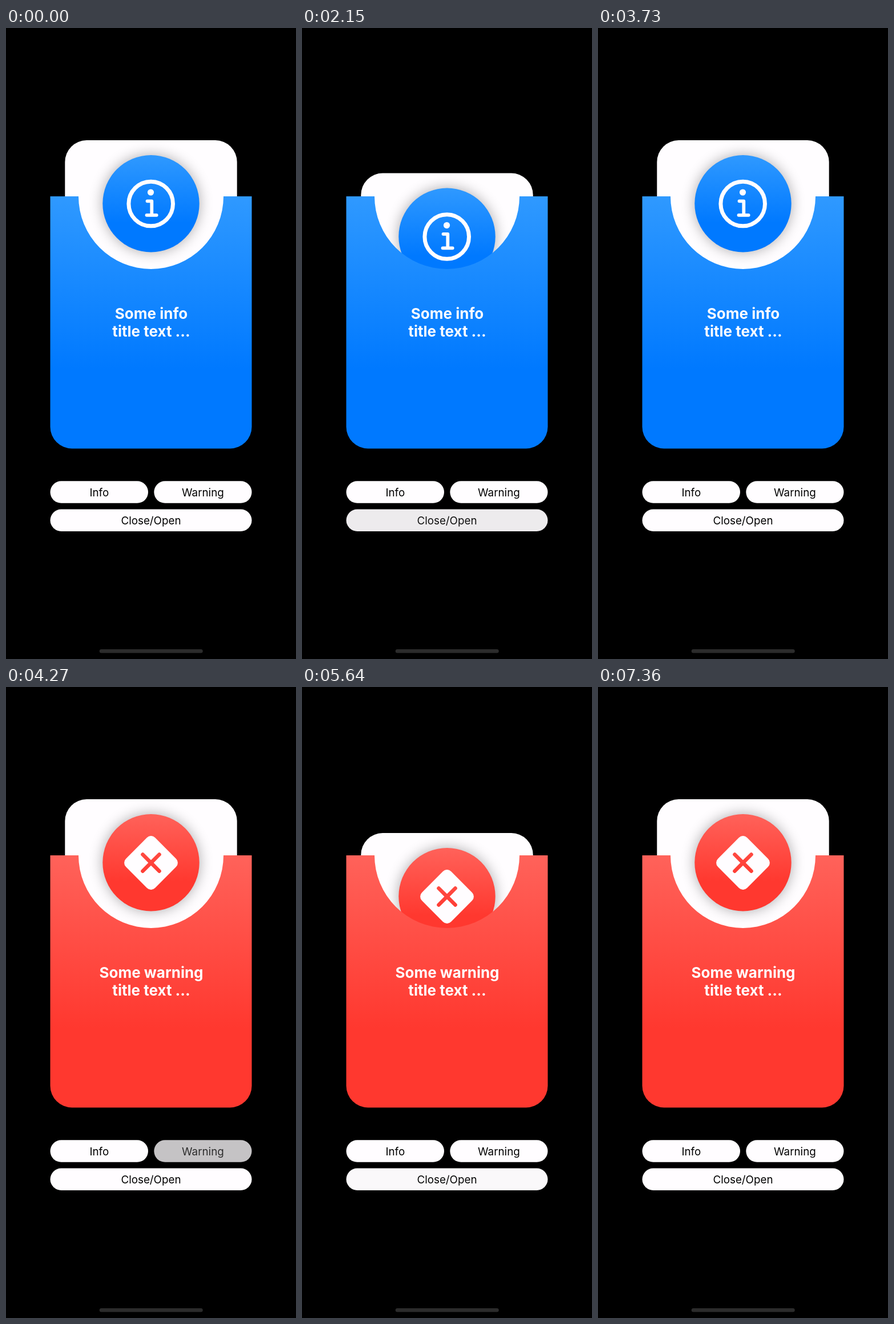
Recreate the animation shown at these times as an HTML page. Size 508 by 1102 pixels, loop 7390 ms.

```html
<!DOCTYPE html>
<html lang="en">
<head>
<meta charset="utf-8">
<title>Card pocket</title>
<style>
  html, body { margin: 0; width: 100%; height: 100%; overflow: hidden; background: #000; }
  svg { display: block; width: 100%; height: 100%; }
  text { font-family: Inter, "Open Sans", sans-serif; text-anchor: middle; }
  .title { font-size: 26px; font-weight: 700; fill: #fffdff; }
  .button rect { fill: #fffdff; }
  .button text { font-size: 18.8px; fill: #000; }
</style>
</head>
<body>
<svg viewBox="0 0 508 1102">
  <defs>
    <linearGradient id="pocketFill" gradientUnits="userSpaceOnUse" x1="0" y1="294" x2="0" y2="596">
      <stop class="light"/><stop class="base" offset="1"/>
    </linearGradient>
    <linearGradient id="badgeFill" gradientUnits="userSpaceOnUse" x1="0" y1="222" x2="0" y2="340">
      <stop class="light"/><stop class="base" offset="1"/>
    </linearGradient>
    <filter id="blur" x="-50%" y="-50%" width="200%" height="200%">
      <feGaussianBlur stdDeviation="11.8"/>
    </filter>
  </defs>
  <rect width="508" height="1102"/>

  <g id="card">
    <rect x="103.3" y="196" width="301.4" height="440" rx="38" fill="#fffdff"/>
    <circle cx="254" cy="306.7" r="84.7" opacity=".33" filter="url(#blur)"/>
    <circle cx="254" cy="306.7" r="84.7" fill="url(#badgeFill)"/>
    <g id="infoIcon" fill="none" stroke="#fffdff" stroke-linecap="round" stroke-linejoin="round">
      <circle cx="253.7" cy="307" r="38.8" stroke-width="7"/>
      <circle cx="253.5" cy="287" r="5.6" fill="#fffdff" stroke="none"/>
      <path d="M247.5 302.3H255.3V326.8M246.5 326.8H263.7" stroke-width="5.8"/>
    </g>
    <g id="warningIcon">
      <rect x="217.9" y="270.9" width="72.2" height="72.2" rx="10" fill="#fffdff" transform="rotate(45 254 307)"/>
      <path d="M239.5 292.5L268.5 321.5M268.5 292.5L239.5 321.5" stroke="url(#badgeFill)" stroke-width="6.6" stroke-linecap="round"/>
    </g>
  </g>

  <path fill="url(#pocketFill)" d="M77.5 294H127A127 127 0 0 0 381 294H430.5V696.5A38 38 0 0 1 392.5 734.5H115.5A38 38 0 0 1 77.5 696.5Z"/>
  <text class="title" id="heading" x="254.5" y="508"></text>
  <text class="title" x="254.5" y="539">title text ...</text>

  <g class="button">
    <rect x="77.5" y="791.3" width="171.5" height="38.5" rx="19.25"/>
    <text x="163.3" y="817.5">Info</text>
  </g>
  <g class="button" id="warningButton">
    <rect x="259.3" y="791.3" width="171.2" height="38.5" rx="19.25"/>
    <text x="344.9" y="817.5">Warning</text>
  </g>
  <g class="button" id="toggleButton">
    <rect x="77.5" y="840.5" width="353" height="38.5" rx="19.25"/>
    <text x="254" y="866.5">Close/Open</text>
  </g>

  <rect x="163.7" y="1085" width="181" height="6.5" rx="3.25" fill="#2c2c2c"/>
</svg>
<script>
  const LOOP = 7390;
  const TRAVEL = 59;
  const MOVE_MS = 330;
  const FADE_MS = 400;
  const PRESSED = 0.54;

  // Touch-down and release times of each tap.
  const toggleTaps = [
    { down: 1850, up: 1861 },
    { down: 2910, up: 2998 },
    { down: 5210, up: 5300 },
    { down: 6205, up: 6295 }
  ];
  const warningTaps = [{ down: 3980, up: 4070 }];

  const themes = {
    info: { light: "#2f99ff", base: "#0079ff", heading: "Some info" },
    warning: { light: "#ff625a", base: "#ff382f", heading: "Some warning" }
  };

  const byId = id => document.getElementById(id);
  const clamp = v => Math.min(1, Math.max(0, v));

  // Cubic timing curve with end points (0,0) and (1,1).
  function bezier(x1, y1, x2, y2) {
    const at = (a, b, s) => 3 * a * s * (1 - s) ** 2 + 3 * b * s * s * (1 - s) + s ** 3;
    return x => {
      let lo = 0, hi = 1;
      for (let i = 0; i < 24; i++) {
        const mid = (lo + hi) / 2;
        if (at(x1, x2, mid) < x) lo = mid; else hi = mid;
      }
      return at(y1, y2, (lo + hi) / 2);
    };
  }
  const easeOut = bezier(0, 0, 0.58, 1);
  const easeInOut = bezier(0.42, 0, 0.58, 1);

  function cardOffset(t) {
    return toggleTaps.reduce((y, tap, i) => {
      if (t < tap.up) return y;
      const target = i % 2 ? 0 : TRAVEL;
      return y + (target - y) * easeOut(clamp((t - tap.up) / MOVE_MS));
    }, 0);
  }

  function buttonOpacity(taps, t) {
    const tap = taps.filter(p => t >= p.down).pop();
    if (!tap) return 1;
    return PRESSED + (1 - PRESSED) * easeInOut(clamp((t - tap.up) / FADE_MS));
  }

  function dim(id, opacity) {
    for (const part of byId(id).children) part.setAttribute("opacity", opacity);
  }

  let shown;
  function setTheme(name) {
    if (name === shown) return;
    shown = name;
    for (const key of ["light", "base"])
      document.querySelectorAll("." + key).forEach(s => s.setAttribute("stop-color", themes[name][key]));
    byId("heading").textContent = themes[name].heading;
    byId("infoIcon").style.display = name === "info" ? "" : "none";
    byId("warningIcon").style.display = name === "warning" ? "" : "none";
  }

  function draw(t) {
    setTheme(t < warningTaps[0].up ? "info" : "warning");
    byId("card").setAttribute("transform", `translate(0 ${cardOffset(t).toFixed(2)})`);
    dim("toggleButton", buttonOpacity(toggleTaps, t));
    dim("warningButton", buttonOpacity(warningTaps, t));
  }

  const start = performance.now();
  function tick() {
    draw((performance.now() - start) % LOOP);
    requestAnimationFrame(tick);
  }
  tick();
</script>
</body>
</html>
```
